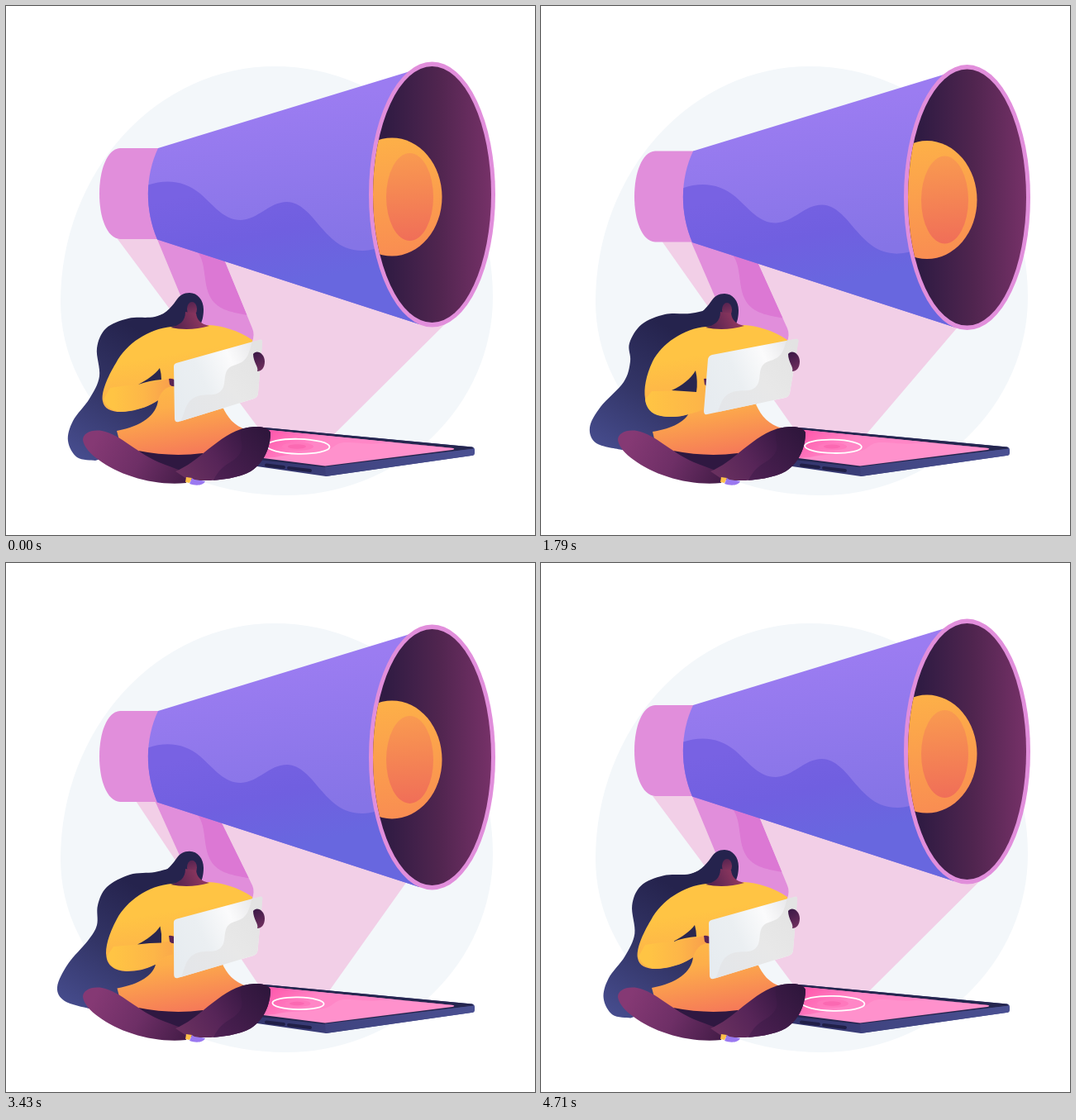
Write an HTML page with a canvas that moves like this. It is 640 px wide and 640 px high and loops after 4.78 s.

```html
<!DOCTYPE html>
<html lang="en">
<head>
<meta charset="utf-8">
<title>Megaphone</title>
<style>
html, body { margin: 0; width: 100%; height: 100%; overflow: hidden; background: #fff; }
canvas { display: block; width: 100vw; height: 100vh; }
</style>
</head>
<body>
<canvas id="stage" width="640" height="640"></canvas>
<script>
const ctx = document.getElementById('stage').getContext('2d');
const LOOP = 4780;
const PINK = '#e18edb';

const lerp = (a, b, p) => a + (b - a) * p;
const smooth = (t, from, to) => {
  const u = Math.min(1, Math.max(0, (t - from) / (to - from)));
  return u * u * (3 - 2 * u);
};

function gradient(x0, y0, x1, y1, ...colors) {
  const g = ctx.createLinearGradient(x0, y0, x1, y1);
  colors.forEach((c, i) => g.addColorStop(i / (colors.length - 1), c));
  return g;
}

function fill(shape, style) {
  const path = typeof shape === 'string' ? new Path2D(shape) : shape;
  ctx.fillStyle = style;
  ctx.fill(path);
  return path;
}

function ellipse(cx, cy, rx, ry, style) {
  const path = new Path2D();
  path.ellipse(cx, cy, rx, ry, 0, 0, Math.PI * 2);
  return fill(path, style);
}

function clipped(path, draw) {
  ctx.save();
  ctx.clip(path);
  draw();
  ctx.restore();
}

function shifted(dy, draw) {
  ctx.save();
  ctx.translate(0, dy);
  draw();
  ctx.restore();
}

// Blend two path strings that share the same commands.
function mix(a, b, p) {
  const other = b.split(' ');
  return a.split(' ').map((v, i) => isNaN(v) ? v : lerp(+v, +other[i], p)).join(' ');
}

// Smooth curve through an open chain of points.
function spline(pts) {
  let d = `M${pts[0]}`;
  for (let i = 0; i < pts.length - 1; i++) {
    const [a, b, c, e] = [pts[i - 1] || pts[i], pts[i], pts[i + 1], pts[i + 2] || pts[i + 1]];
    d += `C${b[0] + (c[0] - a[0]) / 6} ${b[1] + (c[1] - a[1]) / 6} ` +
         `${c[0] - (e[0] - b[0]) / 6} ${c[1] - (e[1] - b[1]) / 6} ${c}`;
  }
  return d;
}

// Hair outline from the shoulder to the lower tip.
const parse = s => s.split(' ').map(p => p.split(',').map(Number));
const rest   = parse('180,376 148,378 121,390 110,414 113,448 101,475 81,502 75,526 86,546 108,550');
const swept  = parse('180,372 150,374 124,384 110,410 109,430 96,448 68,480 57,508 67,527 100,536');
const loose  = parse('180,372 150,373 122,385 107,408 108,430 100,455 72,485 59,510 67,529 98,537');
const full   = parse('180,371 150,371 118,384 106,408 107,435 101,460 78,484 60,508 66,529 96,538');
const coming = parse('180,374 150,377 122,392 111,414 110,438 99,457 75,485 62,513 71,530 100,539');
const settle = parse('180,376 150,380 122,393 113,416 115,445 106,470 84,497 74,523 82,542 106,550');
const hairKeys = [
  [settle, 4140 - LOOP], [rest, 0], [swept, 800], [swept, 1070], [loose, 1790], [full, 2500],
  [loose, 2950], [coming, 3430], [settle, 4140], [rest, LOOP], [swept, LOOP + 800]
];

function hairAt(t) {
  let k = 1;
  while (t >= hairKeys[k + 1][1]) k++;
  const [[p0, t0], [p1, t1], [p2, t2], [p3, t3]] = hairKeys.slice(k - 1, k + 3);
  const span = t2 - t1, u = (t - t1) / span, h = u * u * (3 - 2 * u);
  return p1.map((pt, i) => pt.map((v, j) => {
    const m1 = (p2[i][j] - p0[i][j]) / (t2 - t0) * span;
    const m2 = (p3[i][j] - v) / (t3 - t1) * span;
    return lerp(v, p2[i][j], h) + m1 * u * (1 - u) ** 2 + m2 * u * u * (u - 1);
  }));
}

function backdrop() {
  fill('M66 358A259 285 0 0 1 325 73A264 279 0 0 1 589 352A251 240 0 0 1 338 592A272 234 0 0 1 66 358Z', '#f3f7fa');
}

function beam(dy) {
  fill(`M308 514L${135 + 3.3 * dy} ${282 + dy}L184 265L500 330L${540 - 7 * dy} 376` +
       `L${397 - 0.7 * dy} ${518 - 0.3 * dy}L390 530Z`, '#f2cfe7');
}

function handle(dy) {
  const grip = fill(`M${180 - 0.35 * dy} ${275 + dy}L${261 - 0.55 * dy} ${300 + dy}` +
                    'L298 390Q301 397 298 406L240 420Z', PINK);
  clipped(grip, () => shifted(dy, () => fill(
    'M226 292C244 305 237 330 246 350C254 367 270 370 292 374L310 374L275 280Z', '#dc78d4')));
}

function megaphone() {
  fill('M190 172H138C122 173 113 199 113 227C113 256 122 281 138 282H190Z', PINK);
  const cone = fill('M184 172L492 78L540 228L500 385L183 282.5C168 247 168 206 184 172Z',
    gradient(310, 120, 335, 300, '#9b7cf1', '#8574e6'));
  clipped(cone, () => fill(
    'M165 219C192 208 216 211 235 227C253 243 264 259 284 259C306 258 318 237 340 237' +
    'C374 238 384 297 432 296Q445 295 452 292H560V400H165Z',
    gradient(280, 215, 310, 345, '#7862e3', '#705fe0', '#6867df')));
  ellipse(515.5, 228, 76.5, 160.5, PINK);
  const mouth = ellipse(515.5, 228, 71.5, 155, gradient(460, 228, 587, 228, '#301b43', '#50254f', '#763168'));
  clipped(mouth, () => {
    ellipse(467, 231, 60.5, 71.5, gradient(460, 160, 475, 302, '#fdb048', '#f98d52'));
    ellipse(488.5, 231, 28.5, 53, gradient(485, 178, 492, 284, '#f99a50', '#f06e58'));
  });
}

function phone(dy) {
  fill('M300 509L318 510.5L564 533.5Q567 534 567 537V541Q567 544 563 544L387 569L290 555L270 530Z',
    gradient(300, 0, 560, 0, '#33356c', '#494f91'));
  fill('M300 509L318 510.5L564 533.5Q567 535 564 536L386 558L280 546Z', '#25264f');
  fill('M386 557.5L566 535.5V541Q567 544 563 544L387 569Z', gradient(386, 0, 566, 0, '#3f437f', '#4a5092'));
  const screen = fill('M300 511.5L318 513L541 535Q544 536 540 537L386 556.5L280 543Z', '#ff91cc');
  clipped(screen, () => fill(
    'M280 505H541V535C505 533 480 526 454 529C436 531 428 528 412 528C395 528 399 537 380 540C360 544 345 541 325 546L280 549Z',
    gradient(320, 513, 345, 548, '#ff57ab', '#ff86c6')));
  const s = 1 - dy / 38;
  ellipse(353, 533, 19 * s, 4.8 * s, '#ff78bd');
  ellipse(352, 533, 11 * s, 2.7 * s, '#fb69b2');
  ctx.beginPath();
  ctx.ellipse(353.5, 532.8, 38 * s, 9 * s, 0.02, 0, Math.PI * 2);
  ctx.strokeStyle = '#fff';
  ctx.lineWidth = 1.8;
  ctx.stroke();
  ctx.lineCap = 'round';
  ctx.lineWidth = 4;
  ctx.strokeStyle = '#201f47';
  ctx.stroke(new Path2D('M315 555.5L336 558M342 559L368 562'));
}

function hair(t, headDy) {
  const outline = [[203, 366 + headDy], ...hairAt(t)];
  fill(spline(outline) + 'L140 540L184 520L205 470L210 385Z',
    gradient(165, 395, 80, 540, '#25234d', '#333567', '#464c8d'));
  shifted(headDy, () => {
    fill('M176 378C192 374 199 366 206 356C210 350 215 347 222 347C232 347 239 356 239 367C239 376 237 382 235 386L200 390Z', '#25234d');
    ellipse(225, 366.5, 6, 8.5, gradient(222, 358, 228, 375, '#562350', '#8a375f'));
  });
}

const torsoRest  = 'M 200 388 C 172 391 146 408 133 432 C 122 450 115 468 117 478 C 119 490 133 493 150 490 C 163 488 173 484 184 477 C 182 495 165 508 134 514 L 140 536 L 185 562 L 240 550 L 292 513 C 275 508 268 497 262 485 L 300 445 L 298 404 C 280 392 262 387 245 386 Z';
const torsoBent  = 'M 200 388 C 172 390 146 409 135 430 C 127 447 124 463 126 475 C 128 493 145 498 160 497 C 167 497 172 496 178 494 C 174 502 160 511 135 515 L 140 536 L 185 562 L 240 550 L 292 511 C 275 506 267 497 260 482 L 300 445 L 298 404 C 280 392 262 387 245 386 Z';
const sleeveRest = 'M 126 462 C 150 458 180 456 202 450 L 203 460 C 192 460 187 468 184 477 C 173 484 161 488 148 490 C 131 493 121 486 118 476 Z';
const sleeveBent = 'M 134 466 C 155 466 180 465 200 464 L 200 487 C 192 490 186 492 178 494 C 168 497 156 498 145 496 C 133 494 127 486 126 476 Z';
const gapRest    = 'M 160 458 C 171 452 180 446 186 438 Q 188 445 188 452 Q 174 453 160 458 Z';
const gapBent    = 'M 158 465 C 171 459 181 451 187 441 Q 190 454 188 467 Q 173 466 158 465 Z';

function body(arm) {
  fill(mix(torsoRest, torsoBent, arm), gradient(205, 420, 225, 545, '#ffc444', '#fdae4a', '#f57759'));
  const tip = lerp(205, 250, arm);
  fill(mix(sleeveRest, sleeveBent, arm), gradient(130, 0, tip, 0, '#ffc444', '#fdb648', '#f89c4d'));
  fill(mix(gapRest, gapBent, arm), '#29264f');
  fill('M197 451Q202 450 206 454V460Q200 461 198 458Z', '#5a2453');
  fill('M217 370C217 382 210 386 199 389Q222 394 246 387C236 385 231 380 230 372Z',
    gradient(200, 390, 232, 374, '#4b1f4c', '#8b365e'));
}

function legs() {
  fill('M160 538Q200 546 238 541L245 550L215 570L185 560Z', '#2f1841');
  fill('M93 525C93 517 103 512 116 514C139 518 160 543 190 554C200 558 209 561 220 565L218 577' +
       'C180 581 137 568 112 549C102 542 94 533 93 525Z',
    gradient(110, 520, 215, 575, '#853974', '#6e2f66', '#461d49'));
  const thigh = fill('M320 516C317 508 300 507 284 512C268 517 254 529 240 540C226 552 213 560 205 563' +
       'L220 573C245 576 278 573 296 563C312 553 320 534 320 516Z',
    gradient(215, 570, 290, 525, '#69305f', '#572558', '#3a1945'));
  clipped(thigh, () => fill(
    'M287 505C278 526 292 531 281 544C272 555 260 552 248 580H330V500Z',
    gradient(255, 570, 315, 515, '#4c2052', '#2f163c')));
  fill('M218 570L225 571L222 577L217 576Z', '#ffc04a');
  fill('M225 571C229 575 235 573 241 575C239 580 230 581 222 578Z', '#9a78f0');
}

function tablet(p) {
  const d = mix('M 206 432 L 306 404 Q 311 402 310 408 L 305 468 Q 305 473 300 475 L 209 503 Q 204 504 204 499 L 203 436 Q 203 433 206 432 Z',
                'M 207 422 L 307 403 Q 313 402 311 408 L 301 468 Q 300 473 295 474 L 201 494 Q 197 495 197 490 L 202 427 Q 203 423 207 422 Z', p);
  const slab = fill(d, gradient(203, 470, 312, 420, '#e7ecf0', '#ebeff2', '#fbfbfc', '#e4e4e6'));
  clipped(slab, () => shifted(lerp(0, -5, p), () => fill(
    'M207 510C218 495 214 478 232 472C244 468 255 474 262 463C267 455 261 440 275 435C292 430 293 424 298 405H325V510Z',
    gradient(220, 490, 305, 415, '#e4e6e9', '#e8e8e8', '#e3e3e3'))));
  fill('M299 421C303 415 313 420 313 430C313 438 309 442 304 442C306 437 299 431 299 421Z',
    gradient(300, 420, 312, 440, '#3b1846', '#71305f'));
}

function draw(t) {
  const dy = 3.6 * (1 - Math.cos(4 * Math.PI * t / LOOP));
  const arm = smooth(t, 0, 850) - smooth(t, 2930, 3930);
  const tilt = smooth(t, 0, 750) - smooth(t, 2800, 3600);
  ctx.fillStyle = '#fff';
  ctx.fillRect(0, 0, 640, 640);
  backdrop();
  beam(dy);
  handle(dy);
  shifted(dy, megaphone);
  phone(dy);
  hair(t, dy * 0.27);
  body(arm);
  legs();
  tablet(tilt);
}

const start = performance.now();
function tick() {
  draw((performance.now() - start) % LOOP);
  requestAnimationFrame(tick);
}
tick();
</script>
</body>
</html>
```
